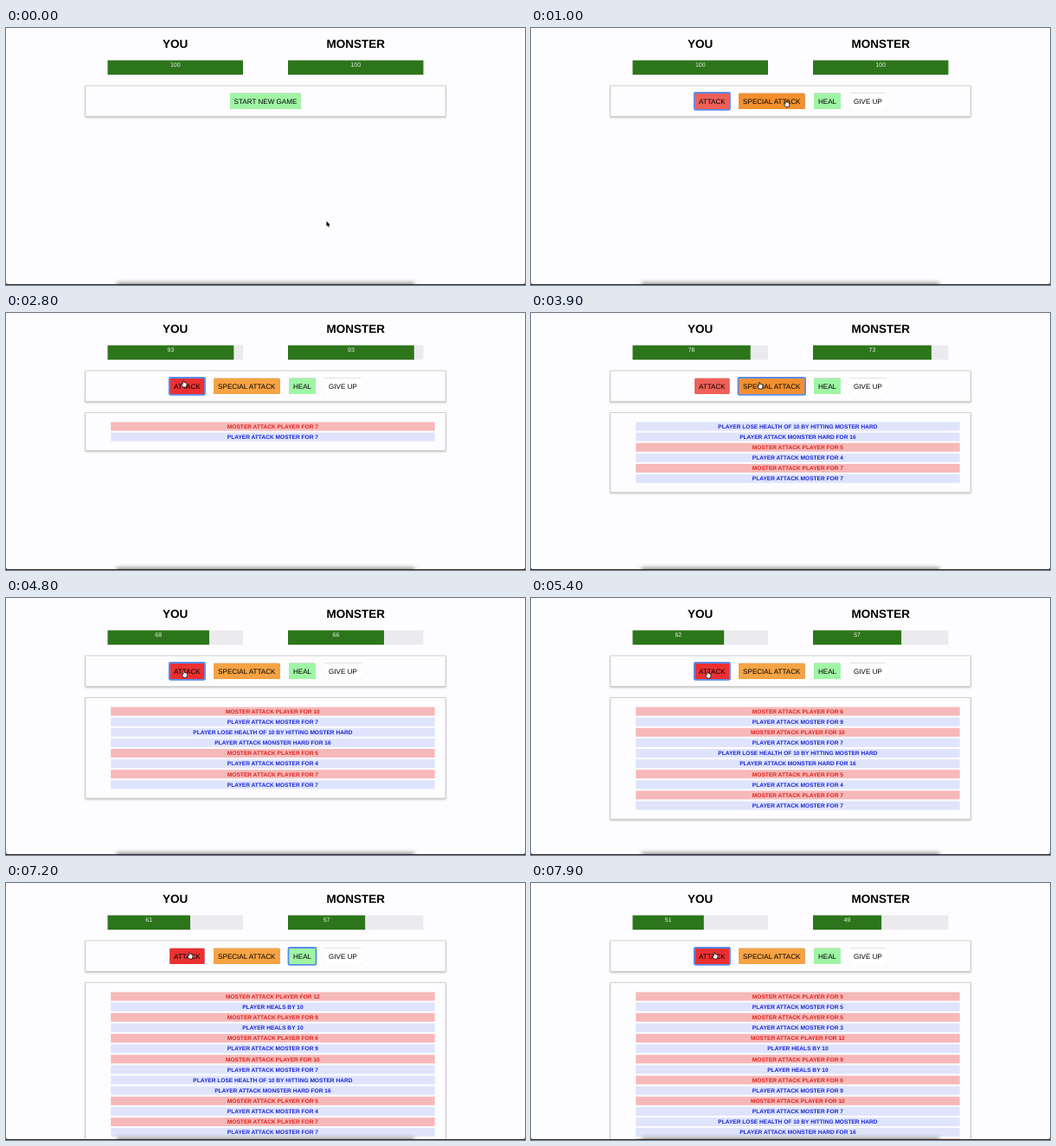
Write an HTML page that moves like this. It is 600x298 px and loops after 8000 ms.

```html
<!DOCTYPE html>
<html lang="en">
<head>
<meta charset="utf-8">
<title>Monster game</title>
<style>
  html, body { margin: 0; width: 100%; height: 100%; overflow: hidden; background: #fdfcfe; }
  svg { display: block; width: 100vw; height: 100vh; }
  text { font-family: "Liberation Sans", Arial, sans-serif; text-anchor: middle; text-rendering: geometricPrecision; }
  .title { font-size: 13.5px; font-weight: bold; }
  .health { font-size: 7px; fill: #e9f1e6; }
  .label { font-size: 8.1px; }
  .entry { font-size: 6.6px; font-weight: bold; }
  .panel { fill: #fdfcfe; stroke: #ccc; stroke-width: .8; filter: drop-shadow(0 1.2px 1.2px #bbb); }
  .face { filter: drop-shadow(0 .9px .6px #777); }
  .ring { fill: none; stroke: #5b8bea; stroke-width: 1.8; }
</style>
</head>
<body>
<svg id="stage" viewBox="0 0 600 298" preserveAspectRatio="none"></svg>
<script>
const LOOP = 8000, STEP = 100, START = 800, BAR_WIDTH = 156.5, BAR_TIME = 500;
const ROW = 12.12;

const stage = document.getElementById("stage");
function add(parent, tag, attrs = {}, text = "") {
  const el = document.createElementNS("http://www.w3.org/2000/svg", tag);
  set(el, attrs);
  el.textContent = text;
  parent.appendChild(el);
  return el;
}
function set(el, attrs) {
  for (const key in attrs) el.setAttribute(key, attrs[key]);
}
function show(el, on) { el.style.display = on ? "" : "none"; }

// Time, kind of move, player's hit or heal, monster's hit
const turns = [
  [2400, "attack", 7, 7],
  [2950, "attack", 4, 5],
  [3850, "special", 16, 10],
  [4700, "attack", 7, 10],
  [5355, "attack", 9, 6],
  [6350, "heal", 10, 9],
  [6750, "heal", 10, 12],
  [7250, "attack", 3, 5],
  [7700, "attack", 5, 5],
];

const states = [{ time: 0, move: "attack", you: 100, monster: 100 }];
const log = [];
for (const [time, move, mine, theirs] of turns) {
  const last = states[states.length - 1];
  const heal = move === "heal";
  states.push({
    time, move,
    you: last.you - theirs + (heal ? mine : 0),
    monster: last.monster - (heal ? 0 : mine),
  });
  const first = heal ? `PLAYER HEALS BY ${mine}`
    : move === "special" ? `PLAYER ATTACK MONSTER HARD FOR ${mine}`
    : `PLAYER ATTACK MOSTER FOR ${mine}`;
  log.push({ time, text: first.replace("HARD FOR", "HARD FOR"), foe: false });
  log.push(move === "special"
    ? { time, text: `PLAYER LOSE HEALTH OF ${theirs} BY HITTING MOSTER HARD`, foe: false }
    : { time, text: `MOSTER ATTACK PLAYER FOR ${theirs}`, foe: true });
}

// Health bars
function makeBar(key, name, x) {
  add(stage, "text", { x: x + BAR_WIDTH / 2, y: 23.4, class: "title" }, name);
  add(stage, "rect", { x, y: 37.5, width: BAR_WIDTH, height: 16.7, fill: "#ebebee" });
  const fill = add(stage, "rect", { x, y: 37.5, height: 16.7, fill: "#2d751b" });
  const value = add(stage, "text", { y: 45.4, class: "health" });
  return { key, x, fill, value };
}
const bars = [makeBar("you", "YOU", 117.5), makeBar("monster", "MONSTER", 326)];

// Controls
add(stage, "rect", { x: 91.9, y: 67, width: 416.2, height: 35.6, class: "panel" });
function makeButton(name, text, x, width, color, hover) {
  const group = add(stage, "g");
  const box = { x, y: 75.8, width, height: 18.2, rx: 1.2 };
  const face = add(group, "rect", { ...box, class: "face" });
  const ring = add(group, "rect", { ...box, x: x - .5, y: 75, width: width + 1, height: 19.8, class: "ring" });
  add(group, "text", { x: x + width / 2, y: 87.8, class: "label" }, text);
  return { name, x, width, color, hover, group, face, ring };
}
const buttons = [
  makeButton("start", "START NEW GAME", 259, 82, "#a0f5a5", "#6cf173"),
  makeButton("attack", "ATTACK", 189.3, 40.2, "#ee6058", "#ec3032"),
  makeButton("special", "SPECIAL ATTACK", 240, 76.6, "#f6a344", "#f3902f"),
  makeButton("heal", "HEAL", 327, 31, "#a0f5a5", "#6cf173"),
  makeButton("giveup", "GIVE UP", 368, 43, "#fff", "#c7c7c7"),
];

// Battle log
const logPanel = add(stage, "rect", { x: 91.9, y: 115.4, width: 416.2, class: "panel" });
const entries = log.map(({ time, text, foe }) => {
  const group = add(stage, "g");
  add(group, "rect", { x: 121.2, width: 374.5, height: 10, fill: foe ? "#f6b8b8" : "#dfe4fc" });
  add(group, "text", { x: 308.4, y: 7.4, class: "entry", fill: foe ? "#e0241f" : "#1926d6" }, text);
  return { time, group };
});

// Window edge
add(stage, "rect", { x: 128, y: 295.5, width: 344, height: 8, fill: "#888", style: "filter: blur(2.5px)" });
add(stage, "path", { d: "M0 295Q0 297 2 297H598Q600 297 600 295V298H0Z", fill: "#2a2a2c" });

const arrow = add(stage, "path", {
  d: "M0 0V6L1.4 4.8L2.3 6.9L3.3 6.5L2.4 4.5H4.3Z", fill: "#000", stroke: "#fff", "stroke-width": .5, "paint-order": "stroke",
});
const hand = add(stage, "path", {
  d: "M-.7 3.8V.6Q0 -.6 .7 .6V2.4Q2 2 2.3 2.9Q4 2.6 3.9 4.2V5.5L3.2 8H-.4L-2.4 4.6Q-1.8 3.4 -.7 4.6Z",
  fill: "#fff", stroke: "#111", "stroke-width": .8,
});

// Pointer stops: time, x, y
const path = [
  [0, 370.5, 224], [400, 312, 97], [500, 312, 97], [700, 304, 86], [900, 303, 86],
  [1400, 225, 64], [1800, 202.5, 53], [2200, 205, 78], [2800, 205, 78], [3300, 206, 80],
  [3700, 264, 80], [3950, 264, 80], [4200, 258, 82], [4550, 206, 84], [5400, 204, 85],
  [5900, 205, 84], [6250, 338, 81], [6800, 338, 81], [7150, 212, 80], [8000, 212, 80],
];
function pointerAt(t) {
  const i = path.findIndex(stop => stop[0] > t);
  const [t0, x0, y0] = path[i - 1], [t1, x1, y1] = path[i];
  const p = (t - t0) / (t1 - t0), k = p * p * (3 - 2 * p);
  return [x0 + (x1 - x0) * k, y0 + (y1 - y0) * k];
}

// CSS "ease": cubic-bezier(.25, .1, .25, 1)
function ease(p) {
  if (p >= 1) return 1;
  const curve = (u, a, b) => 3 * a * u * (1 - u) ** 2 + 3 * b * u * u * (1 - u) + u ** 3;
  let low = 0, high = 1;
  for (let i = 0; i < 20; i++) {
    const mid = (low + high) / 2;
    if (curve(mid, .25, .25) < p) low = mid; else high = mid;
  }
  return curve(low, .1, 1);
}

function draw(t) {
  const index = states.findLastIndex(state => state.time <= t);
  const now = states[index], before = states[Math.max(0, index - 1)];
  const progress = ease((t - now.time) / BAR_TIME);
  for (const { key, x, fill, value } of bars) {
    const width = (before[key] + (now[key] - before[key]) * progress) / 100 * BAR_WIDTH;
    set(fill, { width });
    set(value, { x: x + width / 2 });
    value.textContent = now[key];
  }

  const [px, py] = pointerAt(t), started = t >= START;
  let overButton = false;
  for (const b of buttons) {
    const visible = (b.name !== "start") === started;
    const over = visible && px > b.x && px < b.x + b.width && py > 75.8 && py < 94;
    overButton = overButton || over;
    show(b.group, visible);
    show(b.ring, started && b.name === now.move);
    set(b.face, { fill: over ? b.hover : b.color });
  }

  const count = entries.filter(entry => entry.time <= t).length;
  show(logPanel, count > 0);
  set(logPanel, { height: 20.2 + ROW * count - .4 });
  entries.forEach(({ group }, i) => {
    show(group, i < count);
    set(group, { transform: `translate(0 ${126.5 + ROW * (count - 1 - i)})` });
  });

  show(arrow, !overButton);
  show(hand, overButton);
  set(overButton ? hand : arrow, { transform: `translate(${px} ${py})` });
}

function tick() {
  draw(Math.floor(performance.now() % LOOP / STEP) * STEP);
  requestAnimationFrame(tick);
}
tick();
</script>
</body>
</html>
```
